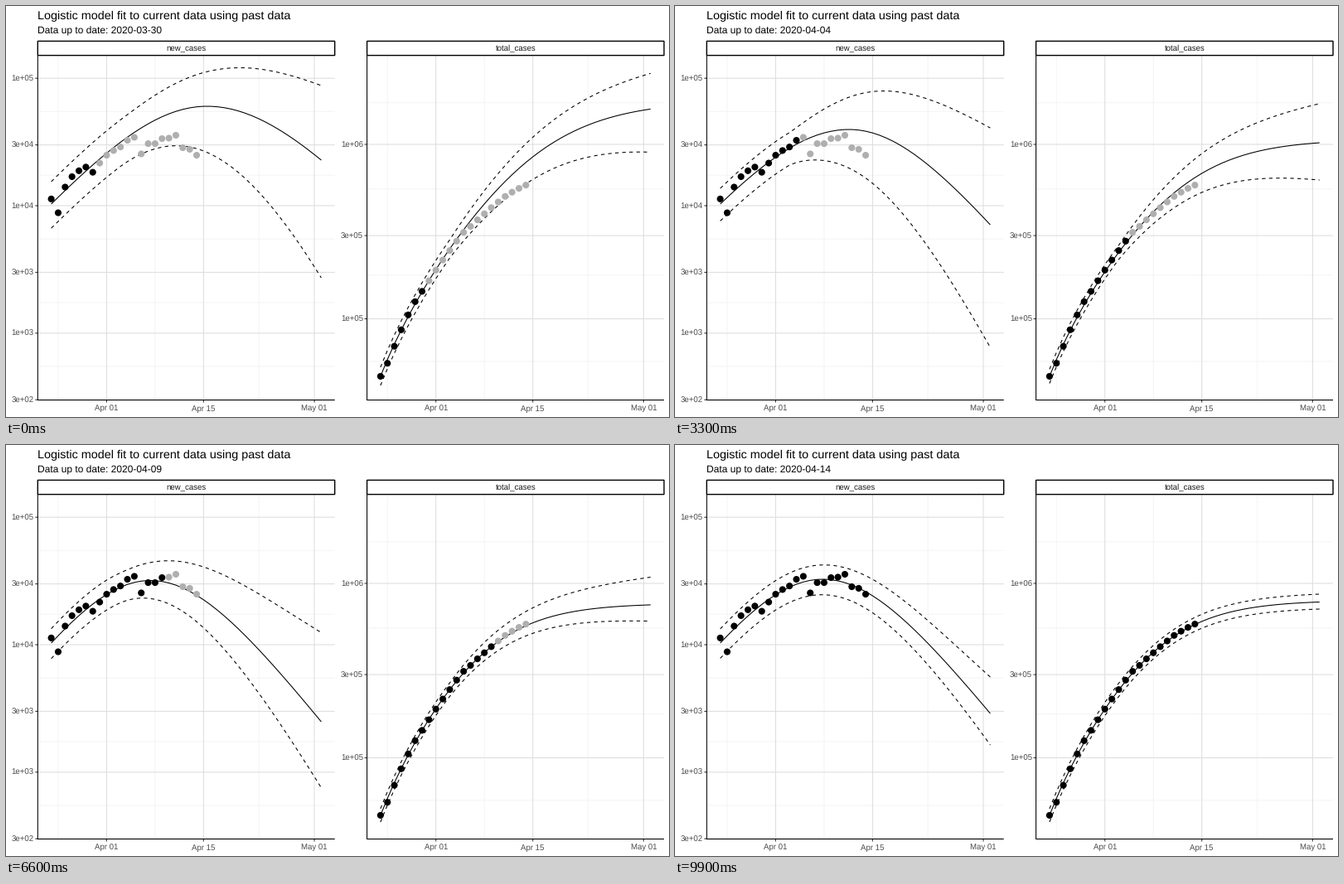
Animation of 800x496 px, one loop 10000 ms. Source, as a matplotlib script:

```python
import numpy as np
import matplotlib.pyplot as plt
from matplotlib.animation import FuncAnimation
from matplotlib.patches import Rectangle

W, H, DPI = 800, 496, 100
PX = 72 / DPI                      # points per pixel
FRAMES, STATES = 100, 16
PANEL_W, TOP, BOTTOM = 358.4, 60, 475.5
DAY = PANEL_W / 1.1 / 39           # pixels per day
LEFT = {"new": 38.3, "total": 435.6}
X0 = {k: v + PANEL_W / 22 for k, v in LEFT.items()}
FIRST_TOTAL = 46800

plt.rcParams["font.family"] = "Liberation Sans"
plt.rcParams["text.hinting"] = "none"

days = np.arange(40)


def new_y(v):
    return 241 - 153.8 * (np.log10(v) - 4)


def new_value(y):
    return 10 ** (4 + (241 - y) / 153.8)


def total_y(v):
    return 167 - 210.5 * (np.log10(v) - 6)


def running_total(daily):
    steps = np.array(daily, float)
    steps[0] = FIRST_TOTAL
    return np.cumsum(steps)


def rate(drop, span):
    """Steepness that makes the bell fall by drop pixels within span days."""
    return np.arccosh(10 ** (drop / 153.8 / 2)) / span


def bell(peak, mid, end, start=239):
    """Slope of a logistic curve, as heights on the log scale."""
    t = days - mid
    k = np.where(t < 0, rate(peak - start and start - peak, mid),
                 rate(end - peak, 39 - mid))
    return peak + 153.8 * 2 * np.log10(np.cosh(k * t))


def spread(near, far, power):
    ramp = np.clip((days - 10) / 29, 0, 1) ** power
    return near + (far - near) * ramp


def fit(s):
    """Six curves (middle, upper, lower for each panel) after s days."""
    key = [0, 2, 5, 8, 10, 12, 15]
    peak = np.interp(s, key, [121, 134, 149, 164.5, 163.5, 160, 162])
    mid = np.interp(s, key, [22.5, 22, 18.6, 13.7, 14.3, 16, 14.8])
    end = np.interp(s, key, [186, 204, 264, 345, 334, 297.5, 324])
    up = np.interp(s, [0, 8, 15], [90, 133, 44])
    down = np.interp(s, [0, 3, 9, 15], [142, 178, 88, 38])
    total_up = np.interp(s, [0, 3, 8, 15], [43, 50, 43, 9.5])
    total_down = np.interp(s, [0, 2, 8, 15], [52, 66, 24, 8.5])

    early = np.exp(-s / 3)
    near = 17 + 10 * early
    power = 1.3 + .014 * (s - 5.5) ** 2
    new = bell(peak, mid, end)
    total = total_y(running_total(new_value(new)))
    total_near = 8 + 3 * early
    return [new,
            new - spread(near, up, power),
            new + spread(near * 1.08, down, power),
            total,
            total - spread(total_near, total_up, 1.05),
            total + spread(total_near, total_down, 1.05)]


fits = [fit(s) for s in range(STATES)]

# Reported cases per day, in thousands
cases = 1000 * np.array([11.3, 8.8, 14, 16.9, 18.8, 20.1, 18.3, 21.6, 24.9,
                         27.1, 28.9, 32.6, 34.4, 25.5, 30.7, 30.7, 33.6,
                         33.9, 35.7, 28.5, 27.7, 24.9])

fig = plt.figure(figsize=(W / DPI, H / DPI), dpi=DPI, facecolor="white")
ax = fig.add_axes([0, 0, 1, 1])
ax.set_xlim(0, W)
ax.set_ylim(H, 0)
ax.axis("off")


def line(xs, ys, color="black", z=1, **kw):
    return ax.plot(xs, ys, color=color, lw=1.07 * PX, zorder=z, snap=False,
                   solid_capstyle="butt", dash_capstyle="butt", **kw)[0]


def label(x, y, s, size, color="black", ha="left"):
    return ax.text(x, y, s, fontsize=size * PX, color=color, ha=ha,
                   va="baseline", zorder=6)


def panel(key, y_of, majors, minor_top, minor_step):
    left, x0 = LEFT[key], X0[key]
    right = left + PANEL_W
    for d in (1, 15, 30):
        line([x0 + d * DAY] * 2, [TOP, BOTTOM], "#f5f5f5")
    for y in np.arange(minor_top, BOTTOM, minor_step):
        line([left, right], [y, y], "#f5f5f5")
    for d, name in ((8, "Apr 01"), (22, "Apr 15"), (38, "May 01")):
        x = x0 + d * DAY
        line([x, x], [TOP, BOTTOM], "#dedede", 2)
        line([x, x], [BOTTOM, BOTTOM + 3], "#333333", 2)
        label(x, 489, name, 9.6, "#4d4d4d", "center")
    for v in majors:
        y = y_of(v)
        line([left, right], [y, y], "#dedede", 2)
        line([left - 3, left], [y, y], "#333333", 2)
        label(left - 4.6, y + 3.5, f"{v:.0e}", 9.6, "#4d4d4d", "right")
    line([left, left], [TOP, BOTTOM], z=3)
    line([left - .5, right], [BOTTOM, BOTTOM], z=3)
    ax.add_patch(Rectangle((left, 42.4), PANEL_W, 17.2, fc="white",
                           ec="black", lw=1.4 * PX, zorder=3, snap=False))
    label((left + right) / 2, 54.5, key + "_cases", 9.6, "#1a1a1a", "center")


panel("new", new_y, [300, 1000, 3000, 10000, 30000, 100000], 127.3, 76.9)
panel("total", total_y, [100000, 300000, 1000000], 116.8, 104)

label(38, 16, "Logistic model fit to current data using past data", 14.4)
date = label(38, 34, "", 12)

curves = [line(X0[key] + days * DAY, days, z=4, ls=style)
          for key in ("new", "total")
          for style in ("-", (0, (4, 4)), (0, (4, 4)))]

dots = []
for key, ys in (("new", new_y(cases)),
                ("total", total_y(running_total(cases)))):
    xs = X0[key] + np.arange(len(ys)) * DAY
    dots.append(ax.scatter(xs, ys, s=(8.1 * PX) ** 2, lw=0, zorder=5,
                           snap=False))


def draw(i):
    # The picture switches on the nearest step, the caption rounds down.
    state = min(int((i + .5) / 6.6), STATES - 1)
    day = 30 + i * (STATES - 1) // (FRAMES - 1)
    stamp = f"03-{day}" if day <= 31 else f"04-{day - 31:02d}"
    date.set_text("Data up to date: 2020-" + stamp)
    for art, ys in zip(curves, fits[state]):
        art.set_ydata(ys)
    colors = ["black" if d <= state + 6 else "#afafaf"
              for d in range(len(cases))]
    for d in dots:
        d.set_facecolor(colors)
    return [date, *dots, *curves]


anim = FuncAnimation(fig, draw, frames=FRAMES, interval=100, repeat=True,
                     repeat_delay=0, init_func=lambda: draw(0))
plt.show()
```
